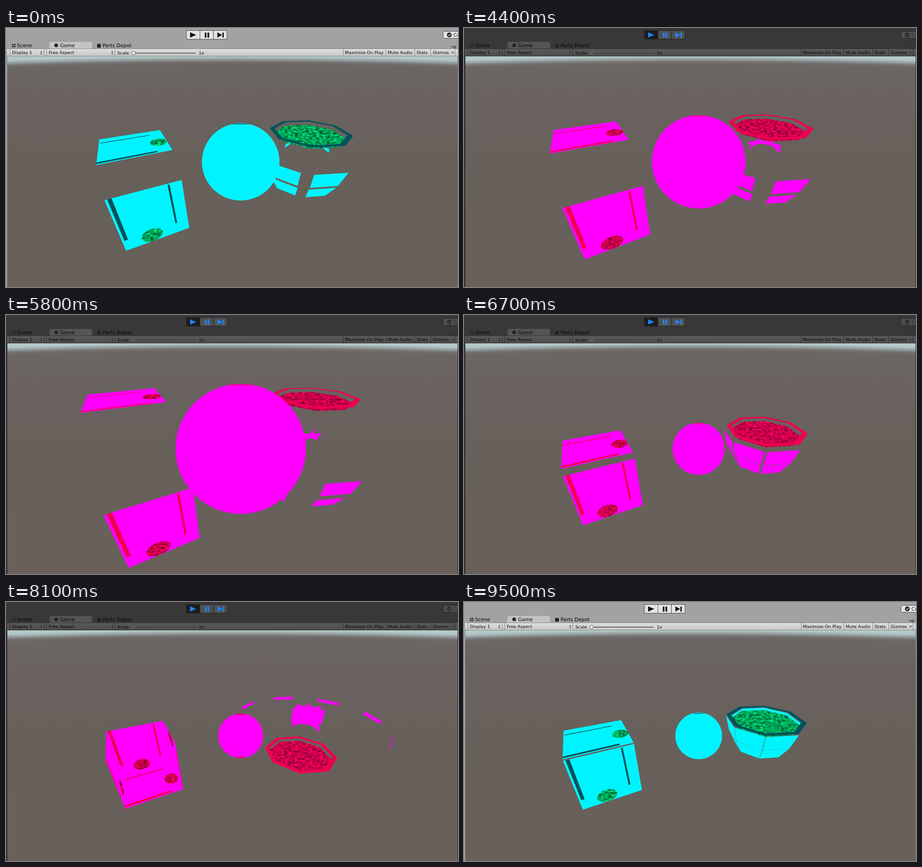
These frames come from a looping animation (987 by 567 pixels, 10000 ms). An HTML page:

```html
<!DOCTYPE html>
<html lang="en">
<head>
<meta charset="utf-8">
<title>Exploding meshes</title>
<style>
html, body { margin: 0; width: 100%; height: 100%; overflow: hidden; }
svg {
  display: block; width: 987px; height: 567px;
  --bar: #a2a2a2; --tab: #c4c4c4; --rowTop: #dedede; --rowEnd: #c6c6c6; --rule: #868686;
  --btn: #e4e4e4; --first: #e4e4e4; --edge: #4a4a4a; --icon: #111; --knob: #eee; --collab: #222;
}
svg.pressed { --first: #777; }
svg.tint {
  --bar: #383838; --tab: #555; --rowTop: #5a5a5a; --rowEnd: #4c4c4c; --rule: #303030;
  --btn: #5a5a5a; --first: #252525; --edge: #222; --knob: #5c5c5c; --collab: #111;
}
svg.live { --btn: #505050; --first: #1c1c1c; --icon: #2083f5; --collab: #2b2b2b; }
text { font: 9.5px "DejaVu Sans", Verdana, sans-serif; fill: #060606; }
text.tab { font-size: 10.8px; }
</style>
</head>
<body>
<svg id="stage" viewBox="0 0 987 567">
  <defs>
    <linearGradient id="ground" x2="0" y2="1">
      <stop offset="0" stop-color="#6c6666"/><stop offset=".2" stop-color="#69625f"/>
      <stop offset=".5" stop-color="#67605a"/><stop offset="1" stop-color="#69605a"/>
    </linearGradient>
    <radialGradient id="sky" gradientUnits="userSpaceOnUse" cx="494" cy="15060" r="15000">
      <stop offset=".9985" stop-color="#6b6665" stop-opacity="0"/>
      <stop offset=".99907" stop-color="#757272"/>
      <stop offset=".99953" stop-color="#9caaa9"/>
      <stop offset=".99987" stop-color="#b4c8c8"/>
    </radialGradient>
    <linearGradient id="row" x2="0" y2="1">
      <stop offset="0" style="stop-color:var(--rowTop)"/><stop offset="1" style="stop-color:var(--rowEnd)"/>
    </linearGradient>
    <filter id="soil" x="0" y="0" width="1" height="1" color-interpolation-filters="sRGB">
      <feTurbulence type="fractalNoise" baseFrequency=".13 .24" numOctaves="2" seed="4"/>
      <feColorMatrix id="soilTone"/>
      <feComposite in2="SourceGraphic" operator="in"/>
    </filter>
  </defs>
  <rect width="987" height="567" fill="var(--bar)"/>
  <rect x="3" y="62" width="983" height="505" fill="url(#ground)"/>
  <rect x="3" y="62" width="983" height="40" fill="url(#sky)"/>
  <g id="scene"></g>
  <g id="chrome"></g>
</svg>
<script>
const stage = document.getElementById('stage');
const scene = document.getElementById('scene');
const soilTone = document.getElementById('soilTone');
const shape = (d, fill) => `<path d="${d}" fill="${fill}" fill-rule="evenodd"/>`;

// ---- editor chrome ----
const label = (x, y, text, cls = '') => `<text x="${x}" y="${y}" class="${cls}">${text}</text>`;
const button = (x, fill) =>
  `<rect x="${x}" y="5.5" width="29.5" height="19" fill="${fill}" stroke="var(--edge)"/>`;
const updown = x => shape(`M${x} 53l2-2.5 2 2.5ZM${x} 55.5l2 2.5 2-2.5Z`, '#222');

document.getElementById('chrome').innerHTML = [
  button(394, 'var(--first)'), button(423.5, 'var(--btn)'), button(453, 'var(--btn)'),
  shape('M402 9.5L415.5 15.3 402 21ZM434 10h3.6v11H434ZM440 10h3.6v11H440Z' +
        'M461.5 9.5L472 15.3 461.5 21ZM472.5 10h3v11h-3Z', 'var(--icon)'),
  '<rect x="954.5" y="7.5" width="50" height="15" rx="3" fill="var(--btn)" stroke="var(--edge)"/>',
  '<circle cx="968" cy="15" r="5.2" fill="var(--collab)"/>',
  '<path d="M965.5 15l2 2 3.5-4" fill="none" stroke="var(--btn)" stroke-width="1.4"/>',
  '<text x="977" y="19" class="tab" style="fill:var(--collab)">Co</text>',
  shape('M95 46V34q0-3.5 4-3.5H184q4 0 4 3.5V46Z', 'var(--tab)'),
  '<path d="M15 34v9M19 34v9M12 36.5h10M12 40.5h10" stroke="#222" stroke-width="1.2"/>',
  '<circle cx="109.5" cy="38" r="4" fill="#222"/>',
  '<rect x="199" y="35" width="8" height="8" rx="1" fill="#222"/>',
  label(24, 42, 'Scene', 'tab'), label(118, 42, 'Game', 'tab'), label(211, 42, 'Parts Depot', 'tab'),
  shape('M971 40h4l-2 2.5Z', '#222'),
  '<path d="M976 39.5h7M976 41.5h7M976 43.5h7" stroke="#333"/>',
  '<rect x="2" y="46" width="985" height="15.5" fill="url(#row)"/>',
  '<path d="M2 45.5H987M2 61.5H987" stroke="var(--rule)"/>',
  [8, 83, 88, 237, 736, 829, 892, 927, 980]
    .map(x => `<path d="M${x + .5} 46V61" stroke="var(--rule)"/>`).join(''),
  label(13, 57, 'Display 1'), label(93.5, 57, 'Free Aspect'), label(243, 58, 'Scale'), label(421, 58, '1x'),
  label(740, 57, 'Maximize On Play'), label(833.5, 57, 'Mute Audio'),
  label(896.5, 57, 'Stats'), label(932, 57, 'Gizmos'),
  updown(75), updown(230), shape('M973 52.5h5l-2.5 3Z', '#222'),
  '<path d="M279 55H414" stroke="#444" stroke-width="1.6"/>',
  '<circle cx="278.5" cy="55" r="4" fill="var(--knob)" stroke="#555"/>',
  '<path d="M2.5 62V567M986.5 62V567" stroke="var(--rule)"/>'
].join('');

// ---- camera at the origin, pitched down, 60 degree field of view ----
const rad = deg => deg * Math.PI / 180;
const FOCAL = 437, PITCH = rad(31.3);
const sum = (...vs) => [0, 1, 2].map(i => vs.reduce((n, v) => n + v[i], 0));
const scale = (v, k) => v.map(n => n * k);
const dot = (a, b) => a[0] * b[0] + a[1] * b[1] + a[2] * b[2];
const depth = ([, y, z]) => z * Math.cos(PITCH) - y * Math.sin(PITCH);
const project = p => {
  const k = FOCAL / depth(p);
  return [494.5 + p[0] * k, 314 - (p[1] * Math.cos(PITCH) + p[2] * Math.sin(PITCH)) * k];
};
const outline = pts => 'M' + pts.map(p => project(p).map(n => n.toFixed(1)).join(' ')).join('L') + 'Z';
const soil = pts => `<path d="${outline(pts)}" filter="url(#soil)"/>`;
const UP = [0, 1, 0], DOWN = [0, -1, 0];

// A face has corners, a normal and a way to paint itself once moved along that normal.
const plain = (pts, tone) => shape(outline(pts), tone.body);

// ---- cube ----
const YAW = rad(27.7), CUBE = [-1.585, -2.143, 2.973];
const right = [Math.cos(YAW), 0, Math.sin(YAW)], back = [-right[2], 0, right[0]];
const box = (u0, v0, u1, v1) => [[u0, v0], [u1, v0], [u1, v1], [u0, v1]];
const bars = [box(.03, 0, .08, .79), box(.79, .02, .82, .79)];
const disc = Array.from({ length: 10 }, (_, i) =>
  [.415 + .165 * Math.cos(i * Math.PI / 5), .87 + .135 * Math.sin(i * Math.PI / 5)]);

function textured(pts, tone) {
  const [o, a, , b] = pts, u = sum(a, scale(o, -1)), v = sum(b, scale(o, -1));
  const place = uvs => uvs.map(([m, n]) => sum(o, scale(u, m), scale(v, n)));
  return plain(pts, tone) + bars.map(bar => shape(outline(place(bar)), tone.trim)).join('') + soil(place(disc));
}

const cube = [
  [scale(back, -1), right, DOWN], [UP, back, right],
  [right, back, DOWN], [scale(right, -1), back, UP]
].map(([normal, u, v]) => ({
  normal, paint: textured,
  pts: box(-.5, -.5, .5, .5).map(([m, n]) => sum(CUBE, scale(normal, .5), scale(u, m), scale(v, n)))
}));

// ---- eight-sided pot ----
const POT = [1.845, 0, 4.59], SIDES = [0, 1, 2, 3, 4, 5, 6, 7];
const RIM = .948, HOLE = .83, TOP = -2.02, EARTH = -2.105;
const spoke = i => [Math.cos(rad(163.9 - 45 * i)), 0, Math.sin(rad(163.9 - 45 * i))];
const potPoint = (i, [r, y]) => sum(POT, scale(spoke(i), r), [0, y, 0]);
const octagon = (r, y) => SIDES.map(i => potPoint(i, [r, y]));

const band = (from, to) => SIDES.map(i => {
  const dr = to[0] - from[0], dy = to[1] - from[1], len = Math.hypot(dr, dy);
  return {
    normal: sum(scale(spoke(i + .5), -dy / len), [0, dr / len, 0]), paint: plain,
    pts: [potPoint(i, from), potPoint(i + 1, from), potPoint(i + 1, to), potPoint(i, to)]
  };
});

const pot = [
  ...band([HOLE, EARTH], [HOLE, TOP]),
  ...band([RIM, TOP], [.83, -2.42]),
  ...band([.83, -2.42], [.63, -2.78]),
  { normal: UP, pts: octagon(.82, EARTH), paint: soil },
  {
    normal: UP, pts: [...octagon(RIM, TOP), ...octagon(HOLE, TOP)],
    paint: (pts, tone) => shape(outline(pts.slice(0, 8)) + outline(pts.slice(8)), tone.trim)
  }
];

const faces = [...cube, ...pot];

// ---- ball ----
const BALL = [.1825, -2.12, 3.897];
function ball(s, tone) {
  const [x, y] = project(BALL);
  const r = FOCAL * Math.tan(Math.asin(Math.abs(.5 + s) / Math.hypot(...BALL)));
  const cap = (cy, h) => `<ellipse cx="${x}" cy="${cy}" rx="${r * .22}" ry="${h}" fill="${tone.trim}"/>`;
  return `<circle cx="${x}" cy="${y}" r="${r}" fill="${tone.body}"/>` + cap(y - r + 2, s < -.5 ? 1.6 : .8) +
    (s < -.5 ? cap(y + r - 2, 1.6) : '');
}

function render(s, tone) {
  const items = [{ far: depth(BALL), svg: ball(s, tone) }];
  for (const { normal, pts, paint } of faces) {
    const moved = pts.map(p => sum(p, scale(normal, s)));
    if (dot(normal, moved[0]) >= 0) continue;
    items.push({ far: depth(scale(sum(...moved), 1 / moved.length)), svg: paint(moved, tone) });
  }
  return items.sort((a, b) => b.far - a.far).map(item => item.svg).join('');
}

// ---- timeline, in seconds ----
const idle = { body: '#00f4ff', trim: '#00525a',
               noise: '0 0 0 0 0  1.1 0 0 0 .09  .55 0 0 0 .07  0 0 0 0 1' };
const live = { body: '#ff00ff', trim: '#ee0050',
               noise: '1.1 0 0 0 .24  0 0 0 0 0  .25 0 0 0 .17  0 0 0 0 1' };
const PRESS = 2.4, DIM = 2.5, READY = 4, START = 4.2, STOP = 9.5;

function push(t) {
  if (t < START) return .345;
  return t < STOP ? Math.cos(1.1 * (t - 5.34)) : .015;
}

function skin(t) {
  if (t < PRESS || t >= STOP) return '';
  if (t < DIM) return 'pressed';
  return t < READY ? 'tint' : 'tint live';
}

let shown = -1;
function draw() {
  const step = Math.floor(performance.now() % 10000 / 100);
  if (step !== shown) {
    shown = step;
    const t = step / 10, tone = t >= START && t < STOP ? live : idle;
    stage.setAttribute('class', skin(t));
    soilTone.setAttribute('values', tone.noise);
    scene.innerHTML = render(push(t), tone);
  }
  requestAnimationFrame(draw);
}
draw();
</script>
</body>
</html>
```
